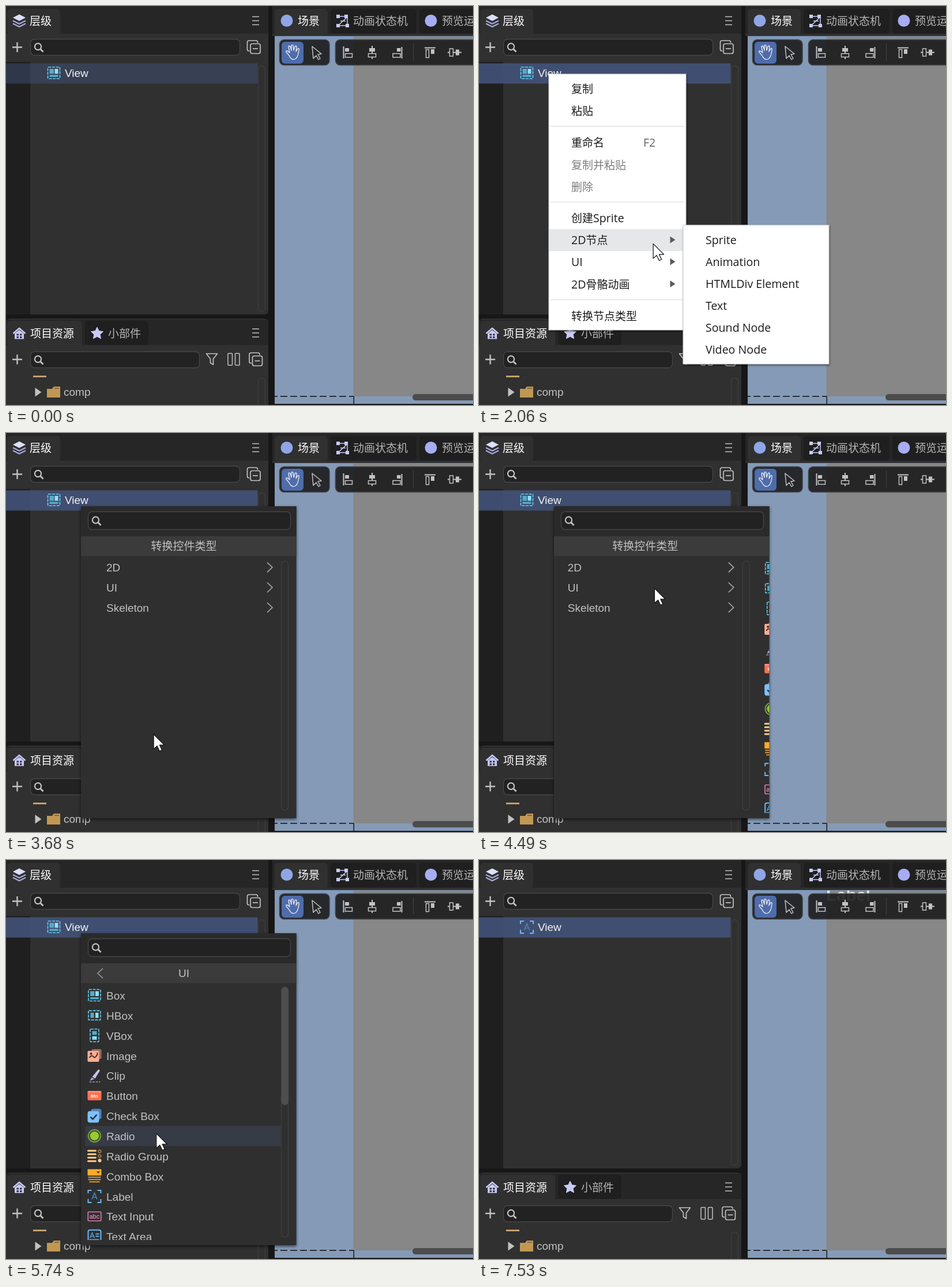
An HTML page that plays this animation: 810 by 692 pixels, repeating every 8470 ms.

```html
<!DOCTYPE html>
<html lang="zh">
<head>
<meta charset="utf-8">
<style>
html, body { margin: 0; width: 100%; height: 100%; overflow: hidden; background: #171717; }
svg { display: block; }
text { font: 19px "Liberation Sans", "Noto Sans CJK SC", "Noto Sans CJK", sans-serif; white-space: pre; }
.menu text { font-family: "Open Sans", "Noto Sans CJK SC", "Noto Sans CJK", sans-serif; }
.menu tspan { font-size: 19.6px; }
.menu { filter: drop-shadow(1px 2px 1.5px #0007); }
#panel { filter: drop-shadow(0 2px 2.5px #0009); }
</style>
</head>
<body>
<svg id="stage" width="810" height="692" viewBox="0 0 810 692"></svg>
<script>
const LOOP = 8470, ROW = 34.85;
const CYAN = '#62d3f4', LILAC = '#c9cbf8', GREY = '#c2c2c2';

const rect = (x, y, w, h, fill, r = 0, more = '') =>
  `<rect x="${x}" y="${y}" width="${w}" height="${h}" fill="${fill}" rx="${r}" ${more}/>`;
const frame = (x, y, w, h, stroke, r = 0, fill = 'none', sw = 1.5) =>
  rect(x, y, w, h, fill, r, `stroke="${stroke}" stroke-width="${sw}"`);
const path = (d, stroke = GREY, w = 2, fill = 'none', more = '') =>
  `<path d="${d}" stroke="${stroke}" stroke-width="${w}" fill="${fill}" ${more}/>`;
const dot = (x, y, r, fill, stroke = 'none', w = 2) =>
  `<circle cx="${x}" cy="${y}" r="${r}" fill="${fill}" stroke="${stroke}" stroke-width="${w}"/>`;
const text = (x, cy, s, fill = GREY, more = '') =>
  `<text x="${x}" y="${cy + 7}" fill="${fill}" ${more}>${s}</text>`;
const group = (id, body, more = '') => `<g id="${id}" ${more}>${body}</g>`;
const at = (x, y, body) => `<g transform="translate(${x} ${y})">${body}</g>`;

// Shared widgets
const search = (x, y, w, h = 28) => frame(x + .5, y + .5, w, h, '#464646', 7, '#222', 1.3) +
  dot(x + 13.5, y + h / 2 - .5, 5.6, 'none', GREY, 2.2) +
  path(`M${x + 17.5} ${y + h / 2 + 3.5}l5 5`, GREY, 2.8);
const plus = y => path(`M11 ${y}h17M19.5 ${y - 8.5}v17`, GREY, 2.4);
const burger = y => path(`M427 ${y - 7}h12M427 ${y}h12M427 ${y + 7}h12`, GREY, 1.7);
const collapse = (x, y) => path(`M${x + 4} ${y + 18}h-1q-3 0-3-3v-12q0-3 3-3h12q3 0 3 3v1`, GREY, 1.7) +
  frame(x + 5.5, y + 5.5, 17, 17, GREY, 3, '#303030', 1.7) + path(`M${x + 9.5} ${y + 14}h9`, GREY, 1.7);
const track = (x, y, h) => frame(x + .5, y, 12, h, '#3e3e3e', 6, 'none', 1.2);

// Icons in a 24 x 24 box
const dashed = (x, y, w, h) =>
  rect(x, y, w, h, 'none', 1, `stroke="${CYAN}" stroke-width="1.6" stroke-dasharray="5 1.6"`);
const blocks = (...list) => list.map((b, i) => rect(...b, i % 2 ? '#8fe0f8' : '#55abc9')).join('');
const brackets = path('M1 7V2H7M17 2h6v5M23 17v6h-6M7 23H1v-6', '#6db9f5', 2);
const icons = {
  box: dashed(1.5, 2, 21, 20) + blocks([4.5, 5, 7.5, 8.5], [13.5, 5, 6, 8.5], [4.5, 15.5, 15, 3.5]),
  hbox: dashed(1.5, 4, 21, 16) + blocks([5, 7.5, 6, 9], [13.5, 7.5, 5.5, 9]),
  vbox: dashed(4.5, 1, 15, 22) + blocks([8, 4.5, 8, 6.5], [8, 13.5, 8, 6]),
  image: rect(7, 1, 17, 17, '#94705e', 2) + rect(0, 4, 20, 19, '#ffad94', 2) +
    path('M3 16q4-6 7-2t7-4v-3', '#4a3029', 2) + dot(6, 9, 2, '#4a3029'),
  clip: path('M8 14L18 2q3-2 3 2l-8 13z', 'none', 0, '#c8c2f0') + path('M7 15l5 3-8 3z', 'none', 0, '#a7a0d8') +
    path('M3 23h19', '#a7a0d8', 1.3, 'none', 'stroke-dasharray="4 1.5"'),
  button: rect(0, 4, 24, 16, '#ff7150', 2) + rect(0, 4, 24, 2, '#ffa28c', 1) +
    `<text x="5.5" y="15" fill="#fff" style="font-size:7.5px;font-weight:700">Btn</text>`,
  check: rect(6, 0, 18, 18, '#4d83b5', 4) + rect(0, 4, 20, 20, '#7fc0fc', 4) + path('M5 14l4 4 7-8', '#26303c', 2.4),
  radio: dot(12, 12, 10.6, 'none', '#6f9b35', 2.2) + dot(12, 12, 7.8, '#97cb2e'),
  group: path('M1 3h13M1 9h13M1 15h13M1 21h13', '#ffcb8b', 3, 'none', 'stroke-linecap="round"') +
    [4, 12].map(y => dot(21, y, 2.4, 'none', '#a98057', 1.5)).join('') + dot(21, 20, 3, '#ffcb8b'),
  combo: rect(0, 0, 24, 11, '#ffa929', 1) + path('M15.5 4h6l-3 3.5z', 'none', 0, '#40301a') +
    path('M1 14h22M1 18h22M3 22h18', '#d99635', 2),
  label: brackets + path('M7.5 17.5L12 6.5l4.5 11M9 14h6', '#4785b5', 1.7),
  input: frame(.8, 4.5, 22.5, 15.5, '#eb91bc', 1, '#3a2b34', 1.4) +
    `<text x="3" y="16" fill="#f3a3ca" style="font-size:11px">abc</text>`,
  area: path('M1 20V4q0-3 3-3h16q3 0 3 3v16', '#6db9f5', 2) +
    path('M4 15l4-9 4 9M5.5 12h5', '#4f9ad2', 1.6) + path('M14 8h6M14 12h6M3 18h17', '#6db9f5', 1.7)
};
const widgets = [['box', 'Box'], ['hbox', 'HBox'], ['vbox', 'VBox'], ['image', 'Image'], ['clip', 'Clip'],
  ['button', 'Button'], ['check', 'Check Box'], ['radio', 'Radio'], ['group', 'Radio Group'],
  ['combo', 'Combo Box'], ['label', 'Label'], ['input', 'Text Input'], ['area', 'Text Area']];

const scene = () => rect(466, 52, 344, 638, '#849ab7') + rect(602.5, 52, 208, 625, '#878787') +
  text(602, 64, 'Label', '#e2e2e2', 'id="sceneLabel" style="font-size:29.5px;font-weight:700"') +
  path('M466 677h137', '#111', 1.6, 'none', 'stroke-dasharray="12 5" stroke-dashoffset="7"') +
  path('M603.3 677v13', '#111', 1.4) + rect(705, 673, 120, 11, '#4c4c4c', 5.5) +
  rect(462, 0, 348, 52, '#262626') + rect(466, 5, 92, 45, '#303030', 6) + rect(462, 48, 348, 4, '#303030') +
  rect(563, 5, 149, 43, '#1f1f1f', 6) + rect(717, 5, 110, 43, '#1f1f1f', 6) +
  path('M466 52.5h344', '#6f8cb4', 1) +
  dot(487, 25.5, 10.5, '#8fa6e6') + text(506, 26, '场景', '#fff', 'font-weight="500"') +
  [[573, 15], [587, 15], [573, 31], [589, 31]].map(([x, y]) => rect(x, y, 6, 6, LILAC)).join('') +
  path('M579 18h8M590 21l-12 11M579 34h10M592 21v10M580 26h9', LILAC, 1.5) +
  text(602, 26, '动画状态机', '#b5b5b5') + dot(737, 25.5, 10.5, '#a6adf2') + text(756, 26, '预览运行', '#b5b5b5');

const tools = () => {
  const bar = (x, w) => frame(x, 58.5, w, 44, '#404348', 8, '#181818dd', 1.5);
  return bar(474.5, 86.5) + bar(571.5, 260) + rect(478, 62, 38, 38, '#4f6cab', 6) +
    path('M491 86l-5-6q-1-3 2-2l4 3-2-10q0-3 3-1l2 7v-8q1-3 3 0l1 8 2-7q3-2 3 1l-1 8 3-5q3-1 2 2-1 11-5 15-7 5-12-5z',
      '#e6e8ee', 1.4, 'none', 'stroke-linejoin="round"') +
    path('M531 70l2 21 5-5 4 7 3-2-4-7 6-1z', GREY, 1.5, 'none', 'stroke-linejoin="round"') +
    path('M585.5 70v21M635 69v23M686.5 71v20M726 72.5h19M766 80.5h24') +
    rect(588, 73, 7, 6, GREY) + frame(588.5, 82.5, 12, 6.5, GREY) +
    rect(630, 73, 10, 6, GREY) + frame(628.5, 82.5, 13, 6, GREY, 0, '#262626') +
    rect(678, 73, 6.5, 6, GREY) + frame(671, 82.5, 13, 6.5, GREY) +
    path('M706.5 65v30', '#404040', 1.2) +
    frame(728.5, 75.5, 5, 14, GREY) + rect(737, 75, 6, 8, GREY) +
    frame(769.5, 74, 6, 13, GREY, 0, '#262626') + rect(780, 75.5, 6, 10, GREY);
};

const hierarchy = () => rect(0, -8, 455, 543, '#303030', 7) + rect(0, 0, 455, 48, '#262626') +
  rect(2, 5, 92, 45, '#303030', 6) +
  path('M12 30.5l11 5.5 11-5.5M12 25.5l11 5.5 11-5.5', '#a5a9dc', 2.4) +
  path('M23 14.5l11 5.7-11 5.7-11-5.7z', 'none', 0, '#dddffc') +
  text(41, 26, '层级', '#fff', 'font-weight="500"') + burger(25.5) +
  plus(71.5) + search(42, 57, 363) + collapse(418.5, 60) + rect(0, 97, 42, 438, '#1f1f1f') +
  rect(0, 99.5, 436.5, 35, '#415078', 0, 'id="selected"') + track(437, 103.5, 426) +
  at(71, 104, group('boxIcon', icons.box) + group('labelIcon', icons.label)) + text(102, 116, 'View', '#f2f2f2');

const assets = () => rect(0, 542, 455, 160, '#303030', 7) + rect(0, 544, 455, 44, '#262626') +
  rect(2, 546, 130, 45, '#303030', 6) + rect(137, 546, 110, 42, '#1f1f1f', 6, 'id="widgetTab"') +
  path('M12.5 568l10.5-9 10.5 9', LILAC, 2.6) + path('M15 568l8-6 8 6v9.5H15z', 'none', 0, LILAC) +
  path('M18.5 568.5h3.5v3h-3.5zM24 568.5h3.5v3H24zM18.5 573h3.5v3h-3.5zM24 573h3.5v3H24z', 'none', 0, '#363646') +
  path('M158 557l3.2 6.6 7.3 1-5.3 5 1.3 7.2-6.5-3.5-6.5 3.5 1.3-7.2-5.3-5 7.3-1z', LILAC, 1, LILAC, 'stroke-linejoin="round"') +
  text(42, 567.5, '项目资源', '#fff', 'font-weight="500"') + text(177, 567.5, '小部件', '#b5b5b5') + burger(567) +
  plus(613) + search(42, 599, 293) +
  path('M347.5 603h19l-7 9v10l-5-3v-7z', GREY, 1.7, 'none', 'stroke-linejoin="round"') +
  frame(385, 602.5, 7.5, 20.5, GREY, 1) + frame(397.5, 602.5, 7.5, 20.5, GREY, 1) + collapse(422, 601.5) +
  rect(47, 641, 23, 3, '#c3a06c') + path('M50.5 662l11 7.8-11 7.8z', 'none', 0, GREY) +
  path('M71 664h9l3-4h11v19H71z', 'none', 0, '#c09854') + path('M84 663h8', '#6e5833', 1.4) +
  text(100, 669, 'comp') + track(437, 645, 70);

// Context menu
const entries = [[144, '复制'], [182, '粘贴'], [237, '重命名'], [275.5, '复制并粘贴', 1], [313.5, '删除', 1],
  [368, '创建Sprite'], [406, '2D节点'], [444, 'UI'], [482.5, '2D骨骼动画'], [538, '转换节点类型']];
const submenus = {
  406: [253, 'Sprite', 'Animation', 'HTMLDiv Element', 'Text', 'Sound Node', 'Video Node'],
  444: [200, ...widgets.slice(0, 8).map(w => w[1])],
  482.5: [169, 'Skeleton']
};
const sizedText = (x, y, s, fill) => text(x, y, s.replace(/[ -~]+/g, '<tspan>$&</tspan>'), fill);
const menu = () => group('menu',
  `<g class="menu">` + frame(121, 118, 238, 444, '#ccc', 0, '#fff', 1) +
  rect(122, 0, 236, 38, '#e6e7e9', 0, 'id="menuHover"') +
  path('M124 208.5h232M124 340h232M124 509.5h232', '#d9d9d9', 1.2) +
  entries.map(([y, s, off]) => sizedText(160, y, s, off ? '#7d7d7d' : '#1c1c1c')).join('') +
  sizedText(285, 237, 'F2', '#666') +
  Object.keys(submenus).map(y => path(`M331.5 ${y - 6.5}l9 6-9 6z`, 'none', 0, '#5c5c5c')).join('') + `</g>` +
  Object.entries(submenus).map(([y, [w, ...items]]) => group('sub' + y,
    frame(354, y - 26, w, items.length * 38 + 13, '#ccc', 0, '#fff', 1) +
    items.map((s, i) => sizedText(393, +y + i * 38, s, '#1c1c1c')).join(''), 'class="menu"')).join(''));

// Type picker
const panel = () => group('panel',
  rect(130, 127, 373.5, 541, '#2f2f2f') + rect(130, 127, 373.5, 52, '#2a2a2a') + search(142, 136, 351, 31) +
  rect(130, 179, 373.5, 34.5, '#3b3b3b') + rect(137.5, 0, 339, ROW, '#373b46', 0, 'id="rowHover"') +
  `<clipPath id="clip">${rect(130, 179, 373.5, 480)}</clipPath><g clip-path="url(#clip)">` +
  group('types', text(308.5, 195.5, '转换控件类型', GREY, 'text-anchor="middle"') + track(477, 222, 432) +
    ['2D', 'UI', 'Skeleton'].map((s, i) => text(174, 233 + i * ROW, s) +
      path(`M453 ${224.5 + i * ROW}l9 8.5-9 8.5`, '#9a9a9a', 1.8)).join('')) +
  group('widgets', text(308.5, 195.5, 'UI', GREY, 'text-anchor="middle"') +
    path('M168 188l-9 8.5 9 8.5', '#8a8a8a', 1.8) + track(477, 222, 432) + rect(477.5, 220, 12.5, 205, '#4e4e4e', 6) +
    widgets.map(([k, s], i) => at(141.5, 222.5 + i * ROW, icons[k]) + text(174, 235 + i * ROW, s)).join('')) + '</g>');

stage.innerHTML = scene() + tools() + hierarchy() + assets() + menu() + panel() +
  '<circle id="click" r="19"/>' +
  path('M0 0v25.5l6-5.4 4.3 9 4.2-1.9-4.2-8.7h8.2z', '#111', 1.2, '#fff', 'id="cursor" stroke-linejoin="round"');

// Pointer path: time, x, y
const route = [[70, 591, 548], [230, 470, 440], [420, 240, 232], [690, 121, 120], [1500, 121, 120],
  [1700, 165, 190], [1900, 258, 340], [2060, 302, 412], [2200, 303, 448], [2330, 290, 474], [2400, 278, 489],
  [2670, 242, 530.5], [3500, 242, 530.5], [3680, 256, 523], [3900, 285, 410], [4220, 304.5, 269.5],
  [5180, 304.5, 269.5], [5500, 286, 360], [5800, 255, 500], [6020, 240, 566], [6160, 237, 574], [6780, 237, 574],
  [7000, 400, 510], [7200, 610, 489], [7380, 720, 555], [7530, 738, 700]];
const clicks = [[840, 970], [1110, 1310, '#dc1428'], [3280, 3430], [4290, 4430], [6360, 6500]];

function slope(i, k) {
  const p = route[i], a = route[i - 1] || p, b = route[i + 1] || p;
  const rests = [a, b].some(q => q !== p && q[1] === p[1] && q[2] === p[2]);
  return rests ? 0 : (b[k] - a[k]) / (b[0] - a[0]);
}
function pointer(t) {
  const i = Math.max(0, route.findLastIndex(p => p[0] <= t));
  const a = route[i], b = route[i + 1];
  if (!b) return [a[1], a[2]];
  const d = b[0] - a[0], u = Math.max(0, (t - a[0]) / d), v = 1 - u;
  return [1, 2].map(k => v * v * (1 + 2 * u) * a[k] + u * u * (3 - 2 * u) * b[k] +
    u * v * d * (v * slope(i, k) - u * slope(i + 1, k)));
}

const el = id => document.getElementById(id);
const show = (id, yes) => el(id).style.display = yes ? '' : 'none';
const set = (id, attrs) => { for (const k in attrs) el(id).setAttribute(k, attrs[k]); };

function draw() {
  const t = performance.now() % LOOP, [x, y] = pointer(t);
  show('cursor', t >= 70 && t < 7530);
  set('cursor', { transform: `translate(${x} ${y})` });

  const press = clicks.find(([a, b]) => t >= a && t < b);
  show('click', press);
  if (press) set('click', { cx: x - 1, cy: y - 1.5, fill: press[2] || '#c8c513', opacity: press[2] ? .65 : .7 });

  set('selected', t < 910 ? { fill: '#415078', opacity: .5 } : { fill: '#44557d', opacity: .85 });
  const changed = t >= 6560;
  show('boxIcon', !changed);
  show('labelIcon', changed);
  show('sceneLabel', t >= 6630);
  set('widgetTab', { fill: changed && x < 247 && y > 546 ? '#2b2b2b' : '#1f1f1f' });

  show('menu', t >= 1310 && t < 3430);
  const hover = entries.find(e => !e[2] && Math.abs(y - e[0]) < 19.1);
  show('menuHover', hover);
  if (hover) set('menuHover', { y: hover[0] - 19 });
  for (const k in submenus) show('sub' + k, hover && hover[0] == k);

  show('panel', t >= 3500 && t < 6560);
  const u = Math.min(1, Math.max(0, (t - 4480) / 400)), slide = 1 - (1 - u) ** 2;
  set('types', { transform: `translate(${-374 * slide} 0)` });
  set('widgets', { transform: `translate(${374 * (1 - slide)} 0)` });
  const top = u < 1 ? 216 : 217.3, row = Math.floor((y - top) / ROW);
  show('rowHover', row >= 0 && row < (u < 1 ? 3 : 13) && (u === 0 || u === 1));
  set('rowHover', { y: top + row * ROW });
  requestAnimationFrame(draw);
}
draw();
</script>
</body>
</html>
```
